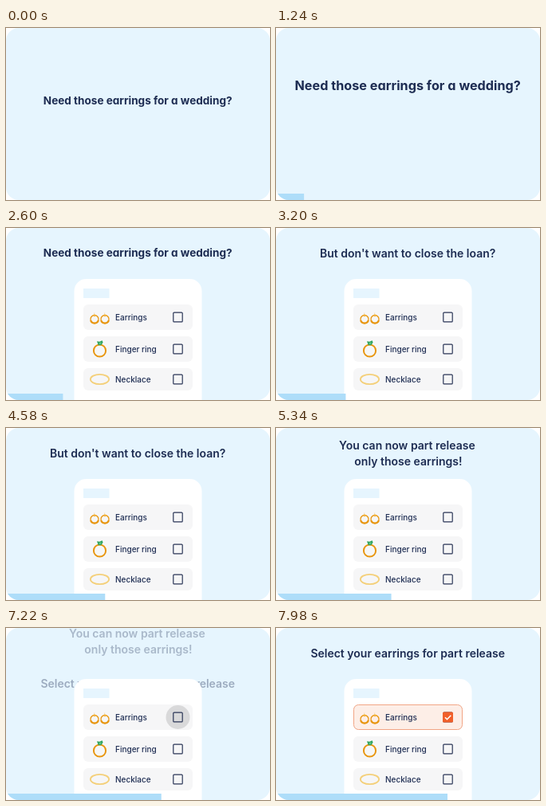
Animation, 331 px wide and 216 px high, one loop 8 s. Source, as an HTML page:

```html
<!DOCTYPE html>
<html lang="en">
<head>
<meta charset="utf-8">
<title>Part release</title>
<style>
  html, body { margin: 0; width: 100%; height: 100%; overflow: hidden; background: #fff; }
  svg { display: block; width: 331px; height: 216px; }
  text { font-family: Inter, sans-serif; fill: #1d2c52; }
  .headline { font-size: 14px; font-weight: 600; text-anchor: middle; }
  .opening { font-size: 13.55px; font-weight: 700; font-feature-settings: "cv11"; }
  .label { font-size: 10px; font-weight: 500; }
  .row { fill: #f6f6f7; }
  .box { fill: none; stroke: #2a3556; stroke-width: 1.2; }
  .gold { fill: none; stroke: #e8960f; }
</style>
</head>
<body>
<svg viewBox="0 0 331 216">
  <defs>
    <clipPath id="card"><rect width="331" height="216" rx="16"/></clipPath>
    <g id="earring">
      <path d="M-.4 -4.5V-8" stroke="#f0d9a8" stroke-width=".8"/>
      <circle class="gold" r="5" stroke-width="1.3"/>
      <path class="gold" d="M-4.8 1.5A5 5 0 0 0 4.8 1.5" stroke-width="2.2"/>
      <circle cy="-4.6" r="1.4" fill="#f3b63f"/>
    </g>
    <rect id="checkbox" class="box" x="-5.7" y="-5.9" width="11.4" height="11.8" rx="1"/>
  </defs>
  <g clip-path="url(#card)">
    <rect width="331" height="216" fill="#e6f5fe"/>
    <g class="headline">
      <text class="opening" id="need" y="4.8">Need those earrings for a wedding?</text>
      <text id="but" y="5">But don't want to close the loan?</text>
      <g id="now">
        <text x="-.8" y="-5">You can now part release</text>
        <text x=".7" y="15">only those earrings!</text>
      </g>
      <text id="select" y="5">Select your earrings for part release</text>
    </g>

    <g id="phone">
      <rect x="85.5" y="64" width="160" height="300" rx="15" fill="#fff"/>
      <rect x="97" y="76" width="32.5" height="12" fill="#e6f5fe"/>
      <rect class="row" x="97" y="96" width="137" height="32" rx="6"/>
      <rect class="row" x="97" y="136" width="137" height="32" rx="6"/>
      <rect class="row" x="97" y="176" width="137" height="28" rx="6"/>
      <rect id="chosenRow" x="97.5" y="96.5" width="136" height="31" rx="6" fill="#fdeee7" stroke="#f2a585"/>

      <use href="#earring" x="111" y="114.5"/>
      <use href="#earring" x="124" y="114.5"/>
      <circle class="gold" cx="117.5" cy="154" r="7.6" stroke-width="2"/>
      <path d="M114 142.3l3.2.4 3.4-1.5 1 2.6-2.4 3.4h-3.4z" fill="#2fa35f"/>
      <path d="M116.4 144.2l1.6 2.4 1.8-3z" fill="#6cc98e"/>
      <ellipse cx="117.5" cy="190" rx="11.6" ry="6.2" fill="none" stroke="#f4d07a" stroke-width="1.8"/>

      <text class="label" x="137" y="116">Earrings</text>
      <text class="label" x="137" y="156">Finger ring</text>
      <text class="label" x="137" y="194">Necklace</text>

      <circle id="ripple" cx="215.5" cy="112" fill="#1a1a1a" fill-opacity=".13"/>
      <use href="#checkbox" x="215.5" y="112"/>
      <use href="#checkbox" x="215.5" y="152"/>
      <use href="#checkbox" x="215.5" y="190"/>
      <g id="tick">
        <rect x="209" y="105.5" width="13" height="13" rx="1.5" fill="#f15f2a"/>
        <path d="M212 112.2l2.5 2.5 4.8-5" fill="none" stroke="#fff" stroke-width="1.5"/>
      </g>
    </g>
    <rect id="progress" y="208" height="8" fill="#aeddf9"/>
  </g>
</svg>
<script>
  const LOOP = 8000, CENTER_X = 165.2, CENTER_Y = 91.2, TOP_Y = 32, OPENING_TOP_Y = 31.2;
  const el = Object.fromEntries([...document.querySelectorAll('[id]')].map(e => [e.id, e]));

  const ramp = (t, start, length) => Math.min(1, Math.max(0, (t - start) / length));
  const ease = x => 0.5 - 0.5 * Math.cos(Math.PI * x);
  const easeOut = x => 1 - (1 - x) ** 3;
  const mix = (a, b, p) => a + (b - a) * p;

  function place(node, y, opacity, scale = 1) {
    node.setAttribute('transform', `translate(${CENTER_X} ${y}) scale(${scale})`);
    node.setAttribute('opacity', opacity);
  }

  // A headline rises from the middle, then lifts a little while fading out.
  function headline(node, t, enter, leave) {
    const shown = ease(ramp(t, enter + 40, 440));
    const gone = ramp(t, leave, 315);
    place(node, mix(CENTER_Y, TOP_Y, shown) - 15 * easeOut(gone), shown * (1 - gone));
  }

  function draw(t) {
    const grow = ease(ramp(t, 100, 700));
    const rise = ease(ramp(t, 1000, 625));
    const shrink = ease(ramp(t, 1000, 650));
    const gone = ramp(t, 2600, 315);
    place(el.need, mix(CENTER_Y, OPENING_TOP_Y, rise) - 15 * easeOut(gone), 1 - gone,
      1 + 0.284 * grow * (1 - shrink));
    headline(el.but, t, 2600, 4800);
    headline(el.now, t, 4800, 7000);
    headline(el.select, t, 7000, Infinity);

    el.phone.setAttribute('transform', `translate(0 ${378 * (1 - rise)})`);
    el.ripple.setAttribute('r', 15 * easeOut(ramp(t, 7000, 200)));
    el.ripple.setAttribute('opacity', 1 - ramp(t, 7300, 150));
    const chosen = ramp(t, 7350, 150);
    el.chosenRow.setAttribute('opacity', chosen);
    el.tick.setAttribute('opacity', chosen);
    el.progress.setAttribute('width', 2 + t * 0.02669);
  }

  const begin = performance.now();
  function frame() {
    draw((performance.now() - begin) % LOOP);
    requestAnimationFrame(frame);
  }
  frame();
</script>
</body>
</html>
```
